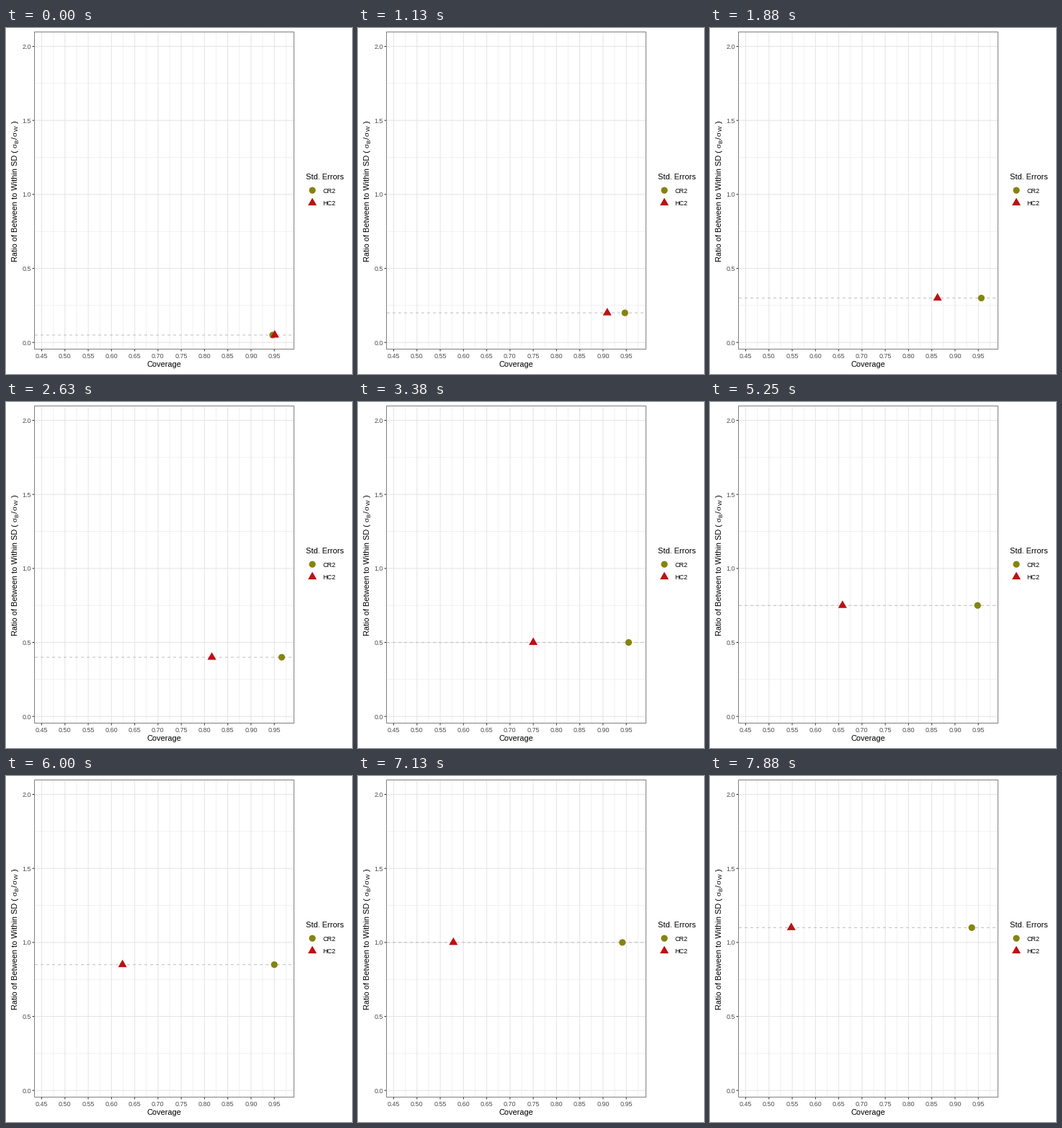
A matplotlib script that plays this animation: 480 px wide and 480 px high, repeating every 8000 ms.

```python
import numpy as np
import matplotlib.pyplot as plt
from matplotlib.animation import FuncAnimation
from matplotlib.patches import Circle, Polygon, Rectangle

SIZE, DPI = 480, 72  # at 72 dpi one point is one pixel
LEFT, RIGHT, TOP, BOTTOM = 39.5, 399.5, 5.5, 445.5
OLIVE, RED = "#84840F", "#BB1114"
SERIES_Z = 5

plt.rcParams["font.family"] = "Liberation Sans"
fig = plt.figure(figsize=(SIZE / DPI, SIZE / DPI), dpi=DPI, facecolor="white")
ax = fig.add_axes([0, 0, 1, 1])
ax.set_xlim(0, SIZE)
ax.set_ylim(SIZE, 0)
ax.axis("off")


def px(coverage):
    return 49.5 + 645.4 * (coverage - 0.45)


def py(ratio):
    return 436.25 - 205.36 * ratio


def line(x0, y0, x1, y1, color, width, z, **kw):
    return ax.plot([x0, x1], [y0, y1], color=color, lw=width, zorder=z,
                   solid_capstyle="butt", dash_capstyle="butt", snap=False, **kw)[0]


def text(x, y, s, size, color="black", ha="left", **kw):
    ax.text(x, y, s, fontsize=size, color=color, ha=ha, va="baseline",
            rotation_mode="anchor", **kw)


def triangle_points(x, y, r=7.0):
    half = r * 0.866
    return [(x, y - r), (x + half, y + r / 2), (x - half, y + r / 2)]


def dot(x, y):
    return ax.add_patch(Circle((x, y), 4.6, fc=OLIVE, ec="none", zorder=SERIES_Z))


def triangle(x, y):
    return ax.add_patch(Polygon(triangle_points(x, y), closed=True, fc=RED,
                                ec="none", zorder=SERIES_Z + 1))


# Grid
for c in np.arange(0.475, 0.98, 0.05):
    line(px(c), TOP, px(c), BOTTOM, "#EBEBEB", 0.7, 1)
for r in np.arange(0.25, 2, 0.5):
    line(LEFT, py(r), RIGHT, py(r), "#EBEBEB", 0.7, 1)

# Major grid, ticks and tick labels
for c in np.arange(0.45, 0.96, 0.05):
    line(px(c), TOP, px(c), BOTTOM, "#E5E5E5", 1.07, 2)
    line(px(c), BOTTOM, px(c), BOTTOM + 2.9, "#333333", 1.07, 2)
    text(px(c), 458, f"{c:.2f}", 9, "#4D4D4D", "center")
for r in np.arange(0, 2.1, 0.5):
    line(LEFT, py(r), RIGHT, py(r), "#E5E5E5", 1.07, 2)
    line(LEFT - 2.9, py(r), LEFT, py(r), "#333333", 1.07, 2)
    text(34.8, py(r) + 3.3, f"{r:.1f}", 9, "#4D4D4D", "right")

ax.add_patch(Rectangle((LEFT, TOP), RIGHT - LEFT, BOTTOM - TOP, fill=False,
                       ec="#7F7F7F", lw=1, zorder=8, snap=False))

# Axis titles
text(219.5, 470, "Coverage", 11, ha="center")
label_parts = [
    (15.5, 324, "Ratio of Between to Within SD (", 11, "Liberation Sans"),
    (15.5, 166, "\u03c3", 11, "Liberation Serif"),
    (17.3, 159.5, "B", 8, "Liberation Sans"),
    (15.5, 153.5, "/", 11, "Liberation Sans"),
    (15.5, 150, "\u03c3", 11, "Liberation Serif"),
    (17.3, 143, "W", 8, "Liberation Sans"),
    (15.5, 131.5, ")", 11, "Liberation Sans"),
]
for x, y, s, size, family in label_parts:
    text(x, y, s, size, rotation=90, family=family)

# Legend
text(416.5, 210, "Std. Errors", 11)
dot(425, 225.2)
triangle(425, 242.6)
text(439, 228.6, "CR2", 9)
text(439, 245.9, "HC2", 9)

# Coverage against ratio for both estimators
KNOTS = [0.05, 0.20, 0.40, 0.50, 0.65, 0.85, 1.10]
HC2 = [0.951, 0.909, 0.8157, 0.750, 0.6925, 0.6237, 0.548]
CR2 = [0.9465, 0.947, 0.966, 0.955, 0.947, 0.950, 0.936]

level = line(40, 0, RIGHT, 0, "#BEBEBE", 1, 4, linestyle=(0, (4, 4)))
cr2_mark = dot(0, 0)
hc2_mark = triangle(0, 0)


def update(i):
    ratio = 0.05 * (i // 3 + 1)
    y = py(ratio)
    level.set_ydata([y, y])
    cr2_mark.center = px(np.interp(ratio, KNOTS, CR2)), y
    hc2_mark.set_xy(triangle_points(px(np.interp(ratio, KNOTS, HC2)), y))
    return level, cr2_mark, hc2_mark


anim = FuncAnimation(fig, update, frames=64, interval=125, repeat=True,
                     repeat_delay=0, init_func=lambda: update(0))
plt.show()
```
